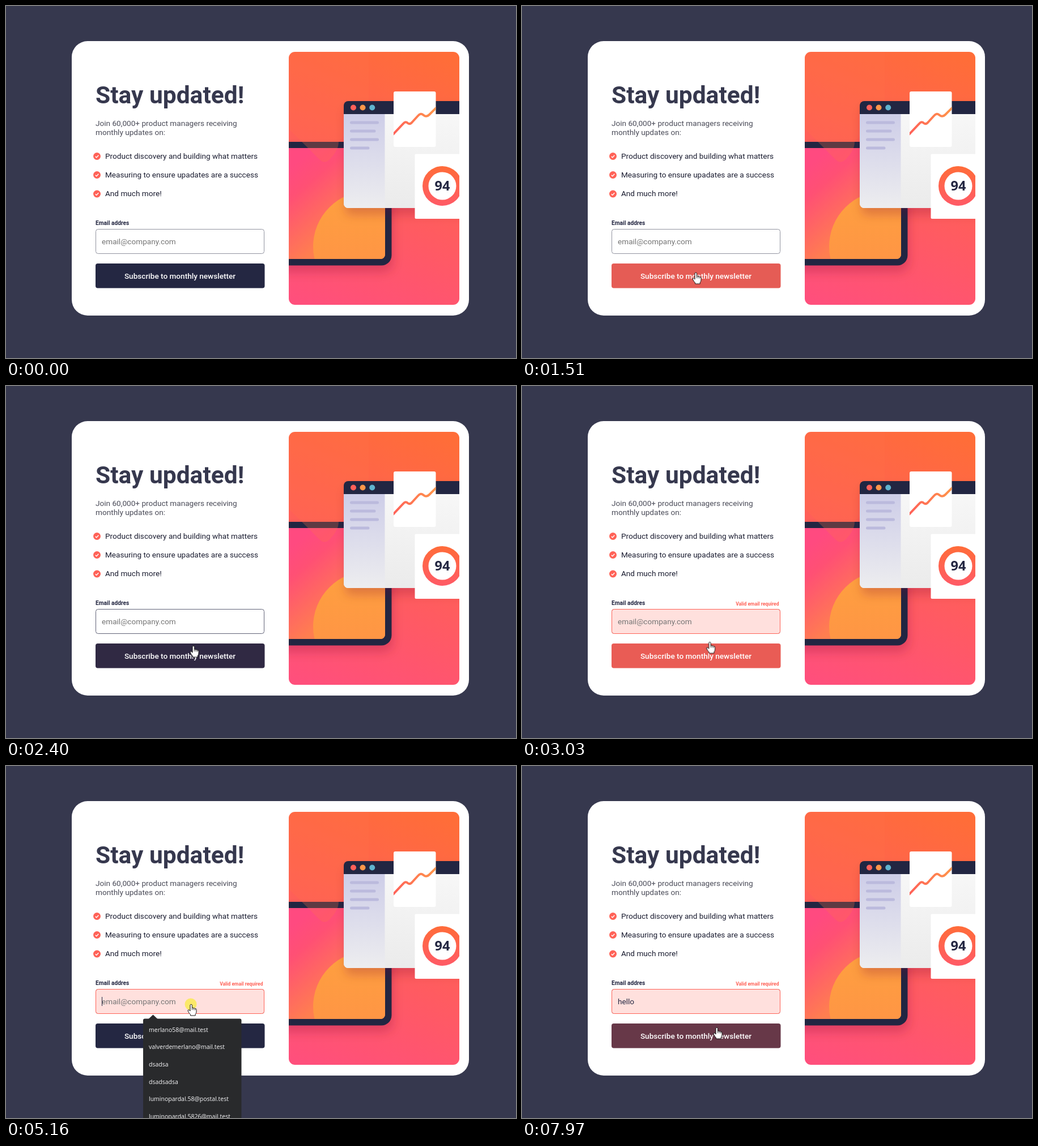
Animation, 900 px wide and 622 px high, one loop 8000 ms. Source, as an HTML page:

```html
<!DOCTYPE html>
<html lang="en">
<head>
<meta charset="utf-8">
<title>Stay updated!</title>
<style>
html, body { margin: 0; width: 100%; height: 100%; overflow: hidden; background: #36384e; }
svg { display: block; width: 100vw; height: 100vh; font-family: Roboto, sans-serif; font-size: 13.6px; }

.ink { fill: #242742; }
.title { font-size: 42.5px; font-weight: 700; fill: #36384e; }
.intro { fill: #4a4b58; }
.list { fill: #1a1c30; }
.label { font-size: 10.2px; font-weight: 700; fill: #242742; }
.warning { font-size: 8.5px; font-weight: 700; fill: #ff6257; text-anchor: end; }
.action { font-weight: 500; fill: #fff; text-anchor: middle; }
.score { font: 700 23.5px "Open Sans", sans-serif; text-anchor: middle; }
.menu { font: 10.5px "Open Sans", sans-serif; fill: #f8f8fa; }

/* One 8 s timeline: 1% = 80 ms */
.anim { animation: 8s linear infinite; }
.step { animation: 8s step-end infinite; }

#button { animation-name: button; }
@keyframes button {
  0%, 15.4% { fill: #242742; }
  18.9% { fill: #e65c55; }
  20%, 21% { fill: #ff6257; }
  24.6%, 29.6% { fill: #242742; }
  30% { fill: #2f2943; }
  33.8%, 37.5% { fill: #ff6257; }
  41.3%, 98.3% { fill: #242742; }
  99.63% { fill: #673848; }
  100% { fill: #724049; }
}

#field { animation-name: field; }
@keyframes field {
  0%, 21.2% { stroke: #9294a0; }
  24%, 29.2% { stroke: #36384e; }
  30% { stroke: #626478; }
  32.5%, 100% { stroke: #9294a0; }
}

#error { animation-name: error; }
@keyframes error { 0% { visibility: hidden; } 34.25%, 100% { visibility: visible; } }

#hint { animation-name: hint; }
@keyframes hint { 0% { visibility: visible; } 76.125%, 100% { visibility: hidden; } }

#menu { animation-name: menu; }
@keyframes menu { 0%, 76.125%, 100% { visibility: hidden; } 64.5% { visibility: visible; } }

#click { animation-name: click; }
@keyframes click { 0%, 66.125%, 100% { visibility: hidden; } 64.5% { visibility: visible; } }

#k1 { animation-name: k1; }
#k2 { animation-name: k2; }
#k3 { animation-name: k3; }
#k4 { animation-name: k4; }
#k5 { animation-name: k5; }
@keyframes k1 { 0% { visibility: hidden; } 76.125%, 100% { visibility: visible; } }
@keyframes k2 { 0% { visibility: hidden; } 78.75%, 100% { visibility: visible; } }
@keyframes k3 { 0% { visibility: hidden; } 83.75%, 100% { visibility: visible; } }
@keyframes k4 { 0% { visibility: hidden; } 85.375%, 100% { visibility: visible; } }
@keyframes k5 { 0% { visibility: hidden; } 87.875%, 100% { visibility: visible; } }

#caret { animation-name: caret; }
@keyframes caret {
  0% { visibility: hidden; transform: none; }
  64.5% { visibility: visible; transform: none; }
  71.125% { visibility: hidden; transform: none; }
  76.125% { visibility: visible; transform: translateX(7px); }
  78.75% { visibility: visible; transform: translateX(15px); }
  83.75% { visibility: visible; transform: translateX(18px); }
  85.375% { visibility: visible; transform: translateX(22px); }
  87.875% { visibility: visible; transform: translateX(29px); }
  94.5%, 100% { visibility: hidden; transform: translateX(29px); }
}

#cursor { animation-name: move; }
@keyframes move {
  0%, 4.125% { transform: translate(647px, 590px); }
  7% { transform: translate(520px, 597px); }
  10% { transform: translate(400px, 594px); }
  13.625% { transform: translate(327px, 555px); }
  16.2% { transform: translate(313px, 500px); }
  18.875% { transform: translate(307px, 471px); }
  21.2% { transform: translate(314px, 437px); }
  24%, 25% { transform: translate(324px, 418px); }
  27.5% { transform: translate(329px, 436px); }
  30% { transform: translate(331px, 459px); }
  32.5%, 35.25% { transform: translate(333px, 476px); }
  37.5% { transform: translate(332px, 455px); }
  41% { transform: translate(329px, 430px); }
  44.75% { transform: translate(327px, 422px); }
  46.375%, 69.3% { transform: translate(327px, 421px); }
  69.375%, 71% { transform: translate(328px, 422px); }
  71.125%, 72.7% { transform: translate(328px, 423px); }
  72.75%, 76% { transform: translate(329px, 423px); }
  76.125%, 96.9% { transform: translate(330px, 424px); }
  97% { transform: translate(331px, 427px); }
  98.5% { transform: translate(338px, 448px); }
  99.625%, 100% { transform: translate(344px, 462px); }
}
#arrow { animation-name: arrow; }
@keyframes arrow { 0%, 16.2%, 100% { visibility: hidden; } 4.125% { visibility: visible; } }
#hand { animation-name: hand; }
@keyframes hand { 0% { visibility: hidden; } 16.2%, 100% { visibility: visible; } }
</style>
</head>
<body>
<svg viewBox="0 0 900 622">
  <defs>
    <linearGradient id="sky" gradientUnits="userSpaceOnUse" x1="750" y1="81" x2="560" y2="540">
      <stop stop-color="#ff6d38"/><stop offset="1" stop-color="#ff4f7c"/>
    </linearGradient>
    <linearGradient id="screen" gradientUnits="userSpaceOnUse" x1="520" y1="270" x2="610" y2="375">
      <stop stop-color="#ff4a80"/><stop offset=".3" stop-color="#ff5074"/><stop offset="1" stop-color="#ff7e50"/>
    </linearGradient>
    <linearGradient id="sun" x2="0" y2="1">
      <stop stop-color="#fea03f"/><stop offset="1" stop-color="#ff8f48"/>
    </linearGradient>
    <linearGradient id="side" x2="0" y2="1">
      <stop stop-color="#cdcde8"/><stop offset="1" stop-color="#ededef"/>
    </linearGradient>
    <linearGradient id="pane" x2="0" y2="1">
      <stop stop-color="#f7f7f7"/><stop offset="1" stop-color="#ebebeb"/>
    </linearGradient>
    <linearGradient id="trend"><stop stop-color="#ff6059"/><stop offset="1" stop-color="#ff964a"/></linearGradient>
    <linearGradient id="ring" x2="0" y2="1">
      <stop stop-color="#ff6c39"/><stop offset="1" stop-color="#ff5a66"/>
    </linearGradient>
    <filter id="shade" x="-20%" y="-20%" width="150%" height="150%">
      <feDropShadow dx="3" dy="12" stdDeviation="9" flood-color="#7a1838" flood-opacity=".24"/>
    </filter>
    <clipPath id="frame"><rect x="499" y="81" width="301" height="447" rx="11"/></clipPath>
    <clipPath id="glass"><rect x="480" y="251" width="189" height="196" rx="8"/></clipPath>
    <clipPath id="window"><rect x="596" y="168" width="230" height="189" rx="8"/></clipPath>
    <clipPath id="paper"><rect x="684" y="151" width="74.5" height="98" rx="3"/></clipPath>
    <g id="tick">
      <circle r="6.5" fill="#ff6257"/>
      <path d="M-2.8 .2L-.8 2.2 2.8-1.8" fill="none" stroke="#fff" stroke-width="1.4"/>
    </g>
  </defs>

  <rect width="900" height="622" fill="#36384e"/>
  <rect x="116" y="62" width="701" height="485" rx="28" fill="#fff"/>

  <g clip-path="url(#frame)">
    <rect x="499" y="81" width="301" height="447" fill="url(#sky)"/>
    <rect class="ink" x="460" y="240" width="220.5" height="218.5" rx="18" filter="url(#shade)"/>
    <g clip-path="url(#glass)">
      <rect x="480" y="251" width="189" height="196" fill="url(#screen)"/>
      <circle cx="640" cy="425" r="98" fill="url(#sun)"/>
    </g>
    <path d="M499 217L552 270Q562 281 572 270Q587 255 587 240L640 180V81H499Z" fill="#ff7048" opacity=".27"/>

    <g filter="url(#shade)">
      <g clip-path="url(#window)">
        <rect x="596" y="191" width="230" height="166" fill="url(#pane)"/>
        <rect x="596" y="191" width="72.5" height="166" fill="url(#side)"/>
        <rect class="ink" x="596" y="168" width="230" height="23"/>
      </g>
    </g>
    <circle cx="613" cy="179.5" r="5" fill="#ff6059"/>
    <circle cx="629.5" cy="179.5" r="5" fill="#ff964a"/>
    <circle cx="646.2" cy="179.5" r="5" fill="#5fb4cf"/>
    <path d="M609.5 206H655.5M609.5 221H650M609.5 236H655.5M609.5 251H639" stroke="#bbbadd" stroke-width="5" stroke-linecap="round"/>

    <g clip-path="url(#paper)">
      <rect x="684" y="151" width="75" height="98" fill="#fff"/>
      <path d="M682 228L701 208Q705 203 709 207Q713 210 717 205L727 194Q732 188 737 193Q742 197 747 192L761 178" fill="none" stroke="url(#trend)" stroke-width="4"/>
    </g>
    <rect x="721.5" y="261.5" width="90" height="114.5" rx="2" fill="#fff"/>
    <path d="M770 283a35 35 0 1 1 0 70a35 35 0 1 1 0-70Zm0 10.5a24.5 24.5 0 1 0 0 49a24.5 24.5 0 1 0 0-49Z" fill="url(#ring)"/>
    <text class="score ink" x="770" y="326">94</text>
  </g>

  <text class="title" x="158" y="171.5">Stay updated!</text>
  <g class="intro">
    <text x="158" y="212">Join 60,000+ product managers receiving</text>
    <text x="158" y="228">monthly updates on:</text>
  </g>
  <use href="#tick" x="160.5" y="265.5"/>
  <use href="#tick" x="160.5" y="298.5"/>
  <use href="#tick" x="160.5" y="332"/>
  <g class="list">
    <text x="175" y="270">Product discovery and building what matters</text>
    <text x="175" y="303">Measuring to ensure upadates are a success</text>
    <text x="175" y="336">And much more!</text>
  </g>

  <text class="label" x="158" y="387">Email addres</text>
  <rect id="field" class="anim" x="158.5" y="394.5" width="297" height="43" rx="4" fill="#fff" stroke="#9294a0"/>
  <g id="error" class="step">
    <rect x="158.5" y="394.5" width="297" height="43" rx="4" fill="#ffe0dd" stroke="#ff6257"/>
    <text class="warning" x="453.5" y="388">Valid email required</text>
  </g>
  <text id="hint" class="step" x="169" y="421" fill="#757575">email@company.com</text>
  <text class="ink" x="169" y="421"><tspan id="k1" class="step">h</tspan><tspan id="k2" class="step">e</tspan><tspan id="k3" class="step">l</tspan><tspan id="k4" class="step">l</tspan><tspan id="k5" class="step">o</tspan></text>
  <rect id="caret" class="step ink" x="169" y="408" width="1" height="16"/>

  <rect id="button" class="anim" x="158" y="455" width="298.5" height="43.5" rx="4"/>
  <text class="action" x="307" y="481.5">Subscribe to monthly newsletter</text>

  <g id="menu" class="step">
    <path d="M251.5 447L259.5 439.5L267.5 447Z" fill="#292a2c"/>
    <rect x="242" y="446.5" width="173.5" height="190" rx="3" fill="#292a2c"/>
    <g class="menu">
      <text x="252" y="469.5">merlano58@mail.test</text>
      <text x="252" y="500.2">valverdemerlano@mail.test</text>
      <text x="252" y="530.9">dsadsa</text>
      <text x="252" y="561.6">dsadsadsa</text>
      <text x="252" y="592.3">luminopardal.58@postal.test</text>
      <text x="252" y="623">luminopardal.5826@mail.test</text>
    </g>
  </g>

  <circle id="click" class="step" cx="326" cy="421" r="10.5" fill="#fbe95c" opacity=".9"/>
  <g id="cursor" class="anim" fill="#fff" stroke="#111" stroke-linejoin="round">
    <path id="arrow" class="step" d="M.5 .5V15L4 11.8 6.3 17 8.6 16 6.4 10.9H11Z"/>
    <g id="hand" class="step">
      <path d="M-2 11V1.7Q-2 .3-.3 .3T1.4 1.7V6.5Q3 5.6 4 7Q5.6 6.2 6.6 7.8Q9 7.3 9 9.5V13Q9 16 7.2 17.6V20H-1.5V18.2Q-4 16-5.8 12Q-6.6 10.3-5 9.8Q-3.6 9.6-2 12Z"/>
      <path d="M1.4 6.5V10M4 7V10.3M6.6 7.8V10.6" fill="none" stroke-width=".8"/>
    </g>
  </g>
</svg>
</body>
</html>
```
